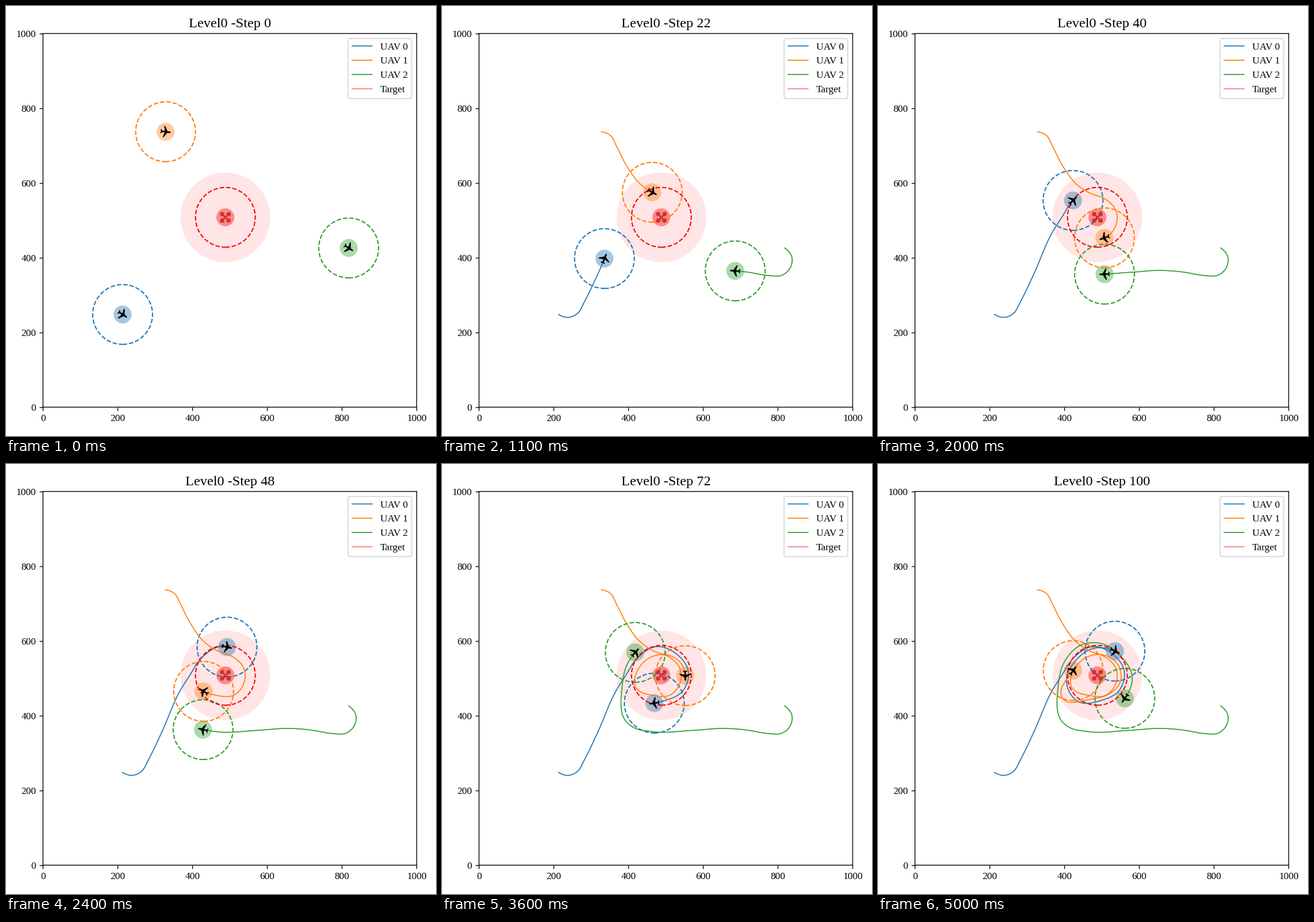
Write a matplotlib script that moves like this. It is 748x748 px and loops after 5100 ms.

```python
import matplotlib.pyplot as plt
import numpy as np
from matplotlib.animation import FuncAnimation
from matplotlib.patches import Circle, Polygon

DPI = 125
SIZE = 748
LEFT, BOTTOM, SPAN = 64.4, 697.8, 650  # axes box in pixels
PX = 1000 / SPAN                       # data units per pixel
STEPS = 100
STEPS_PER_FRAME = 2
TARGET = np.array([488, 508])
SIGNS = (-1, 1)

# Upper half of the aircraft outline, nose to tail, in pixels.
HALF_PLANE = [(9.6, 0), (7.4, 1.4), (3.2, 1.5), (-2, 9.8), (-3.8, 9.8),
              (-1.5, 1.5), (-5.6, 1.1), (-7.6, 3.7), (-9, 3.7), (-8, 0)]
PLANE = PX * np.array(HALF_PLANE + [(x, -y) for x, y in HALF_PLANE[-2:0:-1]])


def orbit(start, end, radii):
    """Points around the target, evenly spaced in angle (degrees)."""
    angle = np.radians(np.linspace(start, end, len(radii)))
    ring = np.column_stack([np.cos(angle), np.sin(angle)])
    return TARGET + ring * np.array(radii)[:, None]


def arc_length(points):
    return np.append(0, np.cumsum(np.hypot(*np.diff(points, axis=0).T)))


def smooth(points):
    """Dense Hermite curve with unit tangents through the points."""
    knots = arc_length(points)
    slope = np.gradient(points, knots, axis=0, edge_order=2)
    slope /= np.hypot(*slope.T)[:, None]
    t = np.linspace(0, knots[-1], 4000)
    i = np.clip(np.searchsorted(knots, t, side="right") - 1, 0, len(points) - 2)
    h = (knots[i + 1] - knots[i])[:, None]
    u = (t - knots[i])[:, None] / h
    v = 1 - u
    return (v * v * ((1 + 2 * u) * points[i] + u * h * slope[i])
            + u * u * ((1 + 2 * v) * points[i + 1] - v * h * slope[i + 1]))


def fly(approach, circling):
    """Position and heading at every step of a constant-speed flight."""
    curve = smooth(np.vstack([approach, circling]))
    length = arc_length(curve)
    at = np.linspace(0, length[-1], STEPS + 1)
    x, y = (np.interp(at, length, c) for c in curve.T)
    dx, dy = (np.interp(at, length, c) for c in np.gradient(curve, axis=0).T)
    return np.column_stack([x, y]), np.arctan2(dy, dx)


def rotated(shape, angle):
    c, s = np.cos(angle), np.sin(angle)
    return shape @ np.array([[c, s], [-s, c]])


def add_disc(center, radius, color, alpha):
    return ax.add_patch(Circle(center, radius, fc=color, ec="none", alpha=alpha))


def add_ring(center, color):
    return ax.add_patch(Circle(center, 80, fill=False, ec=color, lw=1.2,
                               ls="--", zorder=2))


class Uav:
    def __init__(self, index, color, approach, circling):
        self.track, self.heading = fly(approach, circling)
        start = self.track[0]
        self.trail, = ax.plot([], [], color=color, lw=1, label=f"UAV {index}")
        self.disc = add_disc(start, 24, color, 0.4)
        self.ring = add_ring(start, color)
        self.icon = ax.add_patch(Polygon(PLANE, fc="black", ec="none", zorder=3))

    def show(self, step):
        pos = self.track[step]
        self.trail.set_data(*self.track[:step + 1].T)
        self.disc.center = self.ring.center = pos
        self.icon.set_xy(rotated(PLANE, self.heading[step]) + pos)


def add_target():
    ax.plot([], [], color="red", alpha=0.5, lw=1, label="Target")
    add_disc(TARGET, 24, "red", 0.4)
    add_ring(TARGET, "red")
    style = dict(fc="#f05050", ec="#b41212", lw=0.6, zorder=3)
    for rotor in [TARGET + 5.6 * PX * np.array([sx, sy])
                  for sx in SIGNS for sy in SIGNS]:
        ax.plot(*zip(TARGET, rotor), color=style["ec"], lw=0.7, zorder=3)
        for radius in (3.1, 0.8):
            ax.add_patch(Circle(rotor, radius * PX, **style))
    ax.add_patch(Circle(TARGET, 2.4 * PX, **style))


plt.rcParams.update({"font.family": "Liberation Serif", "path.snap": False})
fig = plt.figure(figsize=(SIZE / DPI, SIZE / DPI), dpi=DPI, facecolor="white")
ax = fig.add_axes([LEFT / SIZE, 1 - BOTTOM / SIZE, SPAN / SIZE, SPAN / SIZE])
ax.set(xlim=(0, 1000), ylim=(0, 1000))
title = ax.set_title("", fontsize=14)

add_disc(TARGET, 120, "red", 0.1)
uavs = [
    Uav(0, "tab:blue",
        [(213, 248), (238, 240), (265, 252), (280, 278), (317, 354),
         (371, 474), (391, 505)],
        orbit(144, -306, [79, 78, 70, 73, 71, 68, 87, 84, 70, 73, 80])),
    Uav(1, "tab:orange",
        [(328, 737), (351, 728), (368, 698), (395, 646), (434, 595)],
        orbit(109, -551, [70, 53, 53, 54, 58, 58, 76, 63, 56, 57, 62, 64, 59,
                          65, 112, 66])),
    Uav(2, "tab:green",
        [(818, 426), (837, 403), (832, 371), (808, 352), (778, 352),
         (714, 362), (655, 366), (578, 361), (458, 358), (414, 368)],
        orbit(-125, -400, [157, 109, 95, 92, 85, 81, 93, 96])),
]
add_target()
ax.legend(loc="upper right", fontsize=10)


def update(frame):
    step = frame * STEPS_PER_FRAME
    title.set_text(f"Level0 -Step {step}")
    for uav in uavs:
        uav.show(step)


anim = FuncAnimation(fig, update, frames=STEPS // STEPS_PER_FRAME + 1,
                     interval=100, repeat=True, repeat_delay=0,
                     init_func=lambda: update(0))
plt.show()
```
